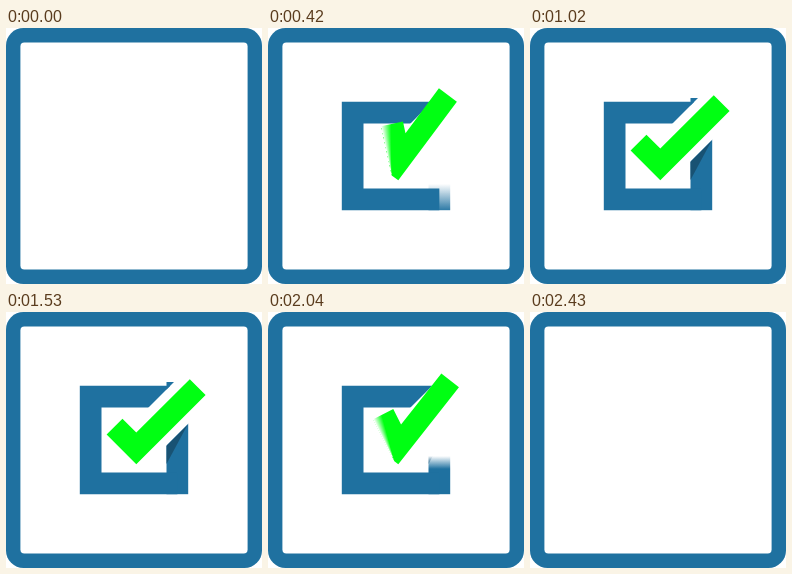
An HTML page with a canvas for the animation above (2550 ms loop, 256 px wide and 256 px high).

```html
<!DOCTYPE html>
<html lang="en">
<head>
<meta charset="utf-8">
<title>Checkbox</title>
<style>
  html, body { margin: 0; width: 100%; height: 100%; overflow: hidden; background: #fff; }
  svg, canvas { position: absolute; left: 0; top: 0; width: 256px; height: 256px; }
</style>
</head>
<body>
<svg viewBox="0 0 256 256">
  <rect width="256" height="256" rx="17.5" fill="#1f71a0"/>
  <rect x="14.4" y="14.4" width="227.2" height="227.2" rx="4" fill="#fff"/>
</svg>
<canvas width="256" height="256"></canvas>
<script>
const LOOP = 2550, STEP = 30, MIRROR = 2520;
const BLUE = '#1f71a0', SHADE = '#185273', GREEN = '#00ff12';
const BOX = { near: 73.8, far: 182.2, bar: 21.7 };
const CHECK = { x: 130.3, y: 152.3, width: 22.4, long: 98, short: 42 };
const ctx = document.querySelector('canvas').getContext('2d');

const progress = (t, from, to) => Math.min(1, Math.max(0, (t - from) / (to - from)));
const rad = deg => deg * Math.PI / 180;

function trace(points) {
  ctx.beginPath();
  points.forEach(([x, y]) => ctx.lineTo(x, y));
  ctx.closePath();
}

function fadeDown(color, top, bottom) {
  const g = ctx.createLinearGradient(0, top, 0, bottom);
  g.addColorStop(0, color + '00');
  g.addColorStop(1, color);
  return g;
}

// The right bar rises with a soft upper end
function drawRightBar(t) {
  const bottom = 184 - 0.45 * (t - 420);
  const top = bottom - Math.max(4, 28 - 0.25 * (t - 420));
  ctx.fillStyle = fadeDown(BLUE, top, bottom);
  ctx.fillRect(BOX.far - BOX.bar, top, BOX.bar, BOX.far - top);
  ctx.fillStyle = fadeDown(SHADE, top, bottom);
  trace([[182, 112], [160.5, 133.5], [160.5, 152]]);
  ctx.fill();
}

function drawBox(t) {
  const { near, far, bar } = BOX;
  const a = near + bar / 2, b = far - bar / 2;
  ctx.save();
  // Diagonal cuts leave room for the check
  trace([[70, 70], [168, 70], [119, 119], [147, 147], [186, 108], [186, 186], [70, 186]]);
  ctx.clip();
  if (t >= 420) drawRightBar(t);

  ctx.strokeStyle = BLUE;
  ctx.lineWidth = bar;
  ctx.setLineDash([0.8 * (t - 90), 999]);
  trace([]);
  ctx.moveTo(164, a);
  ctx.lineTo(a, a);
  ctx.lineTo(a, b);
  ctx.lineTo(b, b);
  ctx.stroke();
  ctx.restore();
}

// Angle of the long arm from vertical: whips past 45 degrees, then settles
function longAngle(t) {
  return t < 600
    ? 36 + 11.3 * progress(t, 240, 600) ** 4
    : 45 + 2.3 * (1 - progress(t, 600, 1020)) ** 2;
}

function drawCheck(t) {
  const grown = progress(t, 210, 360);
  if (!grown) return;
  const { x, y, width: w, long, short } = CHECK;
  const angle = longAngle(t);
  const spread = 36 + 54 * progress(t, 240, 540) ** 2.8;
  const slack = 90 - spread;

  // Unit vectors along each arm; normals point to the inner side
  const l = rad(angle), s = rad(spread - angle);
  const lx = Math.sin(l), ly = -Math.cos(l);
  const sx = -Math.sin(s), sy = -Math.cos(s);
  const onLong = (along, across) => [x + lx * along + ly * across, y + ly * along - lx * across];
  const cut = 0.2 * slack;
  const hinge = onLong(0, cut);
  const onShort = (along, across) =>
    [hinge[0] + sx * along - sy * across, hinge[1] + sy * along + sx * across];

  const tip = [onLong(long, w), onLong(long, 0)];
  ctx.fillStyle = GREEN;
  if (grown < 1) {
    const base = long * (1 - grown);
    trace([...tip, onLong(base, 0), onLong(base, w)]);
  } else {
    const end = short + cut;
    const elbow = (w - cut + w * Math.cos(rad(spread))) / Math.sin(rad(spread));
    trace([onShort(end, 0), onShort(end, w), onShort(elbow, w), ...tip, onLong(0, 0), hinge]);
    if (slack > 0) {
      const g = ctx.createConicGradient(Math.atan2(sy, sx), ...hinge);
      g.addColorStop(0, GREEN + '00');
      g.addColorStop(0.2 * Math.min(1, slack / 20) / (2 * Math.PI), GREEN);
      g.addColorStop(1, GREEN);
      ctx.fillStyle = g;
    }
  }
  ctx.fill();
}

const start = performance.now();
function draw() {
  const now = Math.max(0, performance.now() - start) % LOOP;
  const tick = Math.floor(now / STEP) * STEP;
  const t = Math.min(tick, MIRROR - tick); // the second half plays backwards
  ctx.clearRect(0, 0, 256, 256);
  if (t >= 120) {
    drawBox(t);
    drawCheck(t);
  }
  requestAnimationFrame(draw);
}
draw();
</script>
</body>
</html>
```
